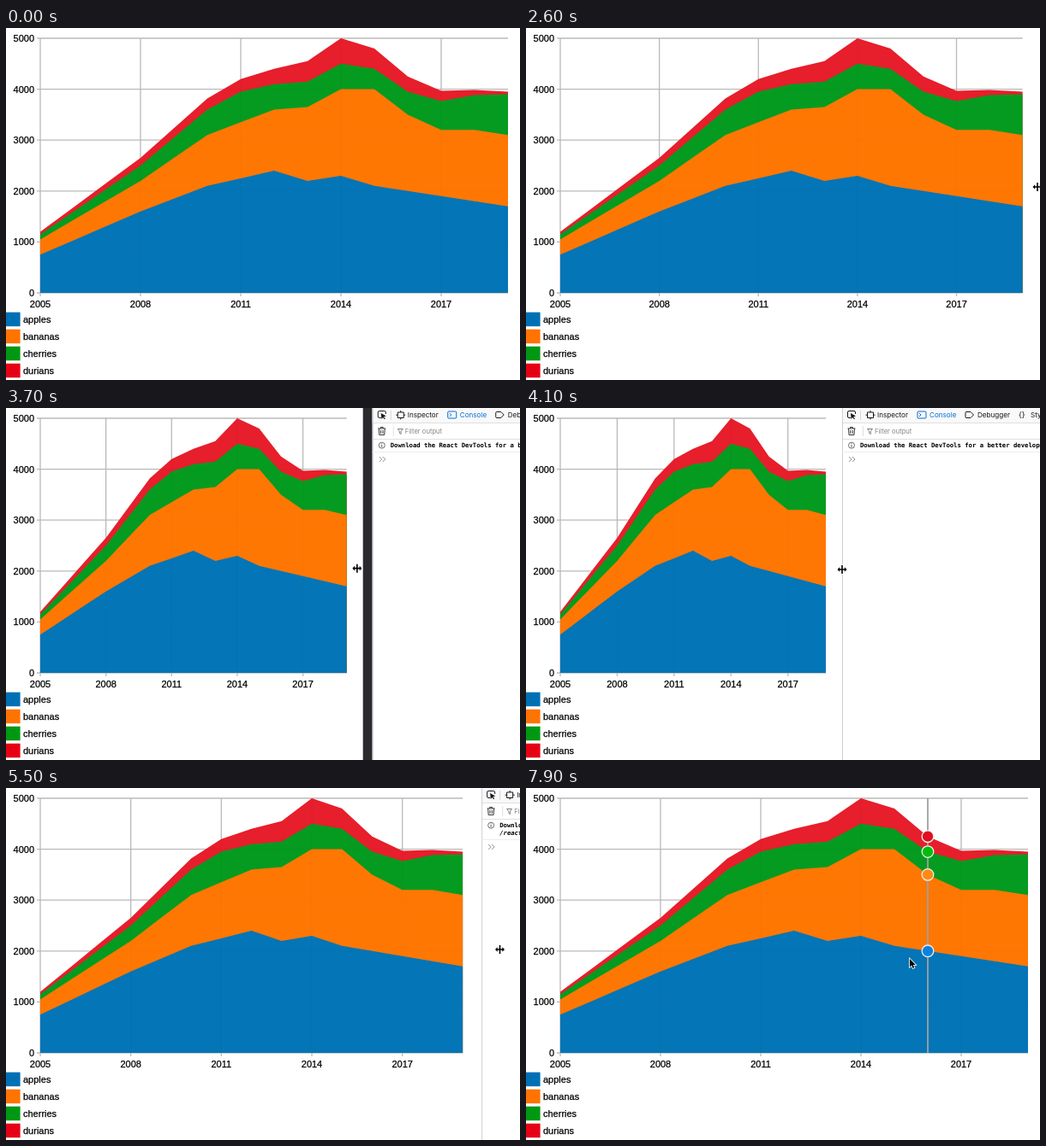
An HTML page with a canvas that plays this animation: 600x412 px, repeating every 8 s.

```html
<!DOCTYPE html>
<html lang="en">
<head>
<meta charset="utf-8">
<title>Resizable area chart</title>
<style>
html, body { margin: 0; width: 100%; height: 100%; overflow: hidden; background: #fff; }
canvas { display: block; }
</style>
</head>
<body>
<canvas width="600" height="412"></canvas>
<script>
const ctx = document.querySelector('canvas').getContext('2d');
const LOOP = 8000, STEP = 100, LEFT = 40, TOP = 12, BASE = 310;
const YEARS = 15, LAST = YEARS - 1, PAGE = 605, GUTTER = 19, RELEASE = 6800;
const SANS = '"Liberation Sans", Arial, sans-serif';
const UI = 'Inter, sans-serif';
const MONO = '"DejaVu Sans Mono", monospace';
const BLUE = '#006fd6', INK = '#18181a';

// Piecewise linear value through [position, value] points
function at(points, p) {
  const i = points.findIndex(([x]) => x >= p);
  if (i < 0) return points[points.length - 1][1];
  if (i === 0) return points[0][1];
  const [x0, a] = points[i - 1], [x1, b] = points[i];
  return a + (b - a) * (p - x0) / (x1 - x0);
}

// Amounts at the turning years, counted from 2005
const series = [
  { name: 'apples', key: '#0070b4', fill: '#0475b6', dot: '#0c82dc',
    amount: [[0, 750], [3, 1600], [5, 2100], [7, 2400], [8, 2200], [9, 2300], [10, 2100], [14, 1700]] },
  { name: 'bananas', key: '#ff7300', fill: '#ff7703', dot: '#ff8a14',
    amount: [[0, 300], [3, 600], [5, 1000], [7, 1200], [9, 1700], [10, 1900], [11, 1500], [12, 1300], [13, 1400]] },
  { name: 'cherries', key: '#009813', fill: '#049b20', dot: '#00bd0c',
    amount: [[0, 100], [3, 300], [6, 600], [7, 500], [9, 500], [10, 400], [11, 450], [14, 800]] },
  { name: 'durians', key: '#e60014', fill: '#e71e2b', dot: '#e0101e',
    amount: [[0, 50], [6, 250], [7, 300], [9, 500], [13, 100], [14, 50]] }
];
const sums = Array(YEARS).fill(0);
for (const s of series) s.top = sums.map((_, i) => sums[i] += at(s.amount, i));

// The mouse drags the divider in and out, then enters the chart as a pointer
const mouseX = [[2350, 607], [2600, 597], [3200, 495], [3940, 369], [4480, 369], [5640, PAGE],
  [RELEASE, PAGE], [7900, 448]];
const mouseY = [[3200, 186], [4100, 189], [RELEASE, 189], [7900, 200]];
const divider = t => at(mouseX, Math.min(t, RELEASE));

const yOf = v => BASE - v * (BASE - TOP) / 5000;

function rect(x, y, w, h, color) {
  ctx.fillStyle = color;
  ctx.fillRect(x, y, w, h);
}

function text(str, x, y, font, color = '#000', align = 'left') {
  ctx.font = font;
  ctx.fillStyle = color;
  ctx.textAlign = align;
  ctx.fillText(str, x, y);
}

function label(str, x, y, align) {
  text(str, x, y, `11px ${SANS}`, '#000', align);
  ctx.strokeStyle = '#000';
  ctx.lineWidth = .25;
  ctx.strokeText(str, x, y);
}

function stroke(d, color, width = 1) {
  ctx.strokeStyle = color;
  ctx.lineWidth = width;
  ctx.stroke(new Path2D(d));
}

function drawGrid(right, color) {
  for (let v = 0; v <= 5000; v += 1000) stroke(`M36 ${yOf(v)}H${right}`, color, 1.3);
  for (let i = 0; i <= LAST; i += 3)
    stroke(`M${LEFT + (right - LEFT) * i / LAST} ${TOP}V314`, color, 1.3);
}

function drawChart(right) {
  const xOf = i => LEFT + (right - LEFT) * i / LAST;
  drawGrid(right, '#bdbdbd');
  // Tallest stack first, so neighbours meet without a seam
  for (const s of [...series].reverse()) {
    ctx.beginPath();
    ctx.moveTo(LEFT, BASE);
    s.top.forEach((v, i) => ctx.lineTo(xOf(i), yOf(v)));
    ctx.lineTo(right, BASE);
    ctx.fillStyle = s.fill;
    ctx.fill();
  }
  drawGrid(right, 'rgba(0, 0, 0, .02)');
  for (let v = 0; v <= 5000; v += 1000) label(v, 33, yOf(v) + 4, 'right');
  for (let i = 0; i <= LAST; i += 3) label(2005 + i, xOf(i), 326.6, 'center');
  series.forEach((s, n) => {
    rect(0, 332.7 + n * 20, 16.6, 16.5, s.key);
    label(s.name, 20, 344.8 + n * 20, 'left');
  });
}

function drawHover(x, right) {
  const step = (right - LEFT) / LAST;
  const i = Math.min(LAST, Math.round((x + 5 - LEFT) / step));
  const cx = LEFT + i * step;
  stroke(`M${cx} ${TOP}V${BASE}`, '#a0a0a0', 1.8);
  for (const s of series) {
    ctx.beginPath();
    ctx.arc(cx, yOf(s.top[i]), 6.8, 0, 7);
    ctx.fillStyle = s.dot;
    ctx.fill();
    ctx.strokeStyle = '#eee';
    ctx.lineWidth = 1.3;
    ctx.stroke();
  }
}

function drawPanel(x) {
  ctx.save();
  ctx.translate(x, 0);
  rect(0, 0, 600, 412, '#fff');
  rect(0, 0, 600, 17, '#f9f9fa');
  for (const y of [17, 36]) rect(0, y, 600, 1, '#e0e0e2');
  rect(0, 0, 1, 412, '#cfcfd2');
  rect(21, 3, 1, 11, '#d7d7db');
  rect(24, 21, 1, 12, '#e0e0e2');

  // Picker and tab icons
  stroke('M10 11.5H8Q6.5 11.5 6.5 10V5Q6.5 3.5 8 3.5H14Q15.5 3.5 15.5 5V7', INK);
  ctx.fillStyle = INK;
  ctx.fill(new Path2D('M10 6L16 9.5L13.3 10.2L15 12.5L14 13.2L12.4 10.9L10.6 13Z'));
  stroke('M29.5 5H36.5V11.5H29.5ZM33 3V5M33 11.5V13.5M27.5 8.2H29.5M36.5 8.2H38.5', INK);
  stroke('M89 4H97Q98 4 98 5V11Q98 12 97 12H89Q88 12 88 11V5Q88 4 89 4ZM90 6L92 8L90 10', BLUE);
  stroke('M145 4.5H150L153.5 8L150 11.5H145Q144 11.5 144 10.5V5.5Q144 4.5 145 4.5Z', INK);
  text('{}', 206, 11, `9px ${UI}`, INK);
  [['Inspector', 41], ['Console', 102, BLUE], ['Debugger', 158], ['Style Editor', 220]]
    .forEach(([name, left, color = INK]) => text(name, left, 11, `8.1px ${UI}`, color));

  // Filter row
  stroke('M6.5 24H15.5M9.5 24V22.5H12.5V24M7.5 24L8 31.5H14L14.5 24M9.8 26V30M12.2 26V30', '#38383d');
  stroke('M29.5 24.5H35.5L33.3 27.3V30.5L31.7 29.5V27.3Z', '#737373', .9);
  text('Filter output', 38, 30, `7.6px ${UI}`, '#858585');

  // Message, wrapped when the panel is narrow
  const wrap = x > 480 ? 9 : 0;
  ctx.beginPath();
  ctx.arc(11, 43.7, 3.5, 0, 7);
  ctx.strokeStyle = '#4a4a4f';
  ctx.lineWidth = .8;
  ctx.stroke();
  stroke('M11 43V46M11 41.4V42.3', '#4a4a4f', .9);
  text('Download the React DevTools for a better development experience', 21, 46, `bold 7.26px ${MONO}`);
  if (wrap) text('/react-devtools', 21, 55, `italic bold 7.26px ${MONO}`);
  rect(0, 51 + wrap, 600, 1, '#ededf0');
  stroke(`M8 ${57 + wrap}l3 3l-3 3M12 ${57 + wrap}l3 3l-3 3`, '#85858a', .9);
  ctx.restore();
}

function drawMouse(x, y, pointer) {
  ctx.save();
  ctx.translate(x, y);
  const path = new Path2D(pointer
    ? 'M0 0V9.5L2.2 7.5L3.7 11L5.3 10.3L3.8 6.9H6.8Z'
    : 'M-5.5 0L-2.8 -2.8V-.8H-.8V-5H.8V-.8H2.8V-2.8L5.5 0L2.8 2.8V.8H.8V5H-.8V.8H-2.8V2.8Z');
  ctx.strokeStyle = '#fff';
  ctx.lineWidth = 1.6;
  ctx.stroke(path);
  ctx.fillStyle = '#000';
  ctx.fill(path);
  ctx.restore();
}

function draw(t) {
  // Panel and page trail the mouse; the page shrinks sooner than it grows
  const panel = divider(t - 105);
  const page = Math.min(PAGE, divider(t - 40), divider(t - 120));
  const right = page - GUTTER, x = at(mouseX, t), pointer = t > RELEASE;
  rect(0, 0, 600, 412, '#fff');
  drawChart(right);
  if (pointer && x < right) drawHover(x, right);
  if (panel - page > 5) rect(page, 0, panel - page, 412, '#2a2a2e');
  if (panel < 600) drawPanel(panel);
  drawMouse(x, at(mouseY, t), pointer);
}

const start = performance.now();
function tick() {
  const t = (performance.now() - start) % LOOP;
  draw(Math.floor(t / STEP) * STEP);
  requestAnimationFrame(tick);
}
tick();
</script>
</body>
</html>
```
